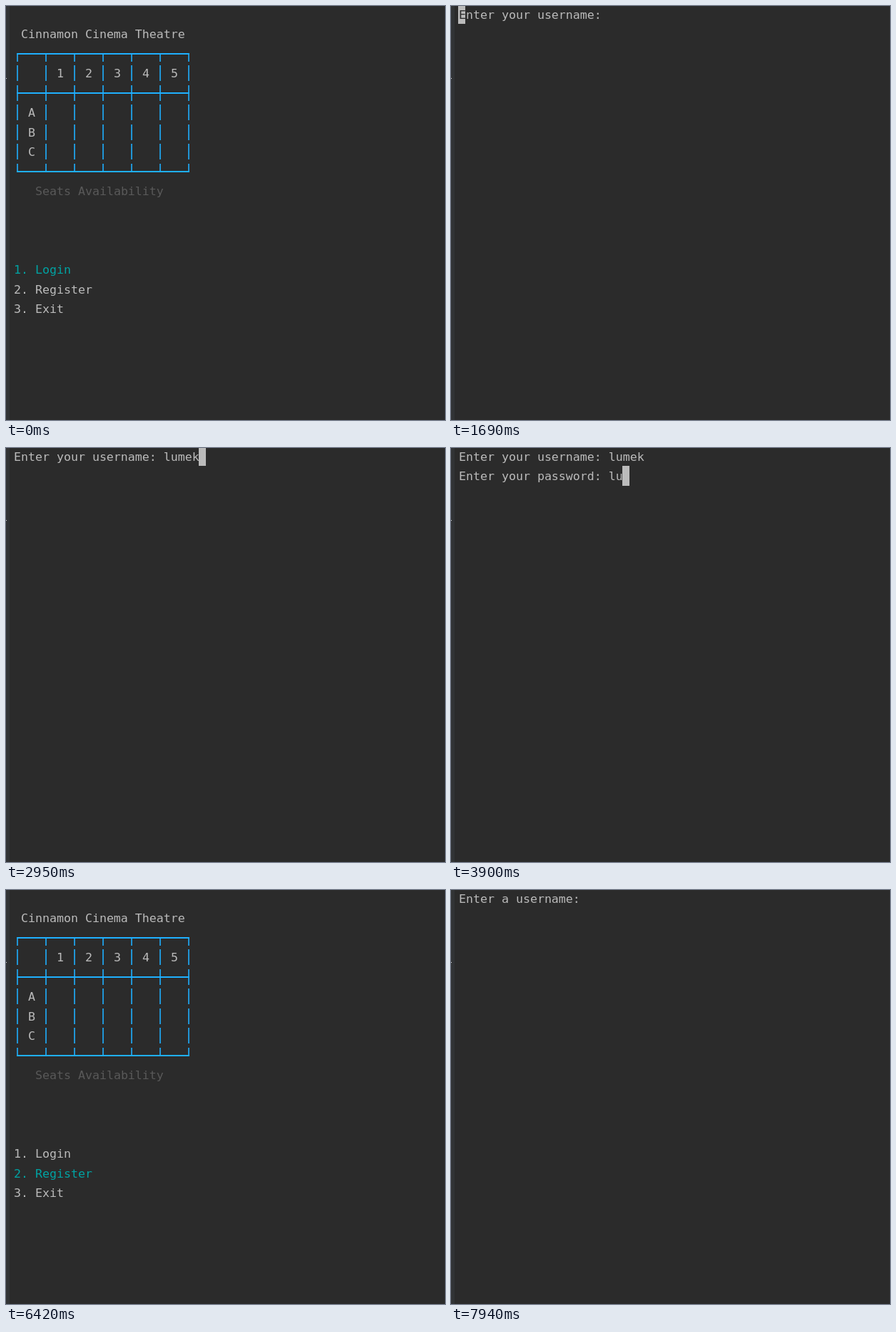
These frames come from a looping animation (615 by 580 pixels, 8 s). An HTML page with a canvas:

```html
<!DOCTYPE html>
<html lang="en">
<head>
<meta charset="utf-8">
<title>Terminal session</title>
<style>
  html, body { margin: 0; width: 100%; height: 100%; overflow: hidden; background: #2b2b2b; }
  canvas { display: block; }
</style>
</head>
<body>
<canvas id="stage" width="615" height="580"></canvas>
<script>
const ctx = document.getElementById('stage').getContext('2d', { alpha: false });
const LOOP = 8000, LEFT = 10, CELL = 10, ROW = 27.5;
const BG = '#2b2b2b', TEXT = '#bbbbbb', BLUE = '#1fb0ff', CYAN = '#00a3a3', GRAY = '#595959', RED = '#ff4050';
const USER = 'lumek';
const ASK_NAME = 'Enter your username: ', ASK_PASSWORD = 'Enter your password: ', ASK_NEW = 'Enter a username: ';

const baseline = row => Math.floor(18 + ROW * row);

function rect(x, y, w, h, color) {
  ctx.fillStyle = color;
  ctx.fillRect(x, y, w, h);
}

// Glyphs sit one pixel right of their cell's edge.
function print(text, col, row, color = TEXT) {
  ctx.fillStyle = color;
  ctx.fillText(text, LEFT + 1 + CELL * col, baseline(row));
}

function cursor(col, row, under = '') {
  rect(LEFT + CELL * col, 28 * row - 3, CELL, 28, TEXT);
  print(under, col, row, BG);
}

function table(top) {
  for (let i = 0; i <= 6; i++) {
    const base = baseline(top + i);
    const middle = base - 6;
    const from = i === 0 ? middle - 1 : base - 17;
    const to = i === 6 ? middle + 1 : base + 5;
    for (let k = 0; k <= 6; k++) rect(15.2 + 40 * k, from, 1.6, to - from, BLUE);
    if (i === 0 || i === 2 || i === 6) rect(15.2, middle - 1, 241.6, 2, BLUE);
  }
  for (let n = 1; n <= 5; n++) print(String(n), 2 + 4 * n, top + 1);
  [...'ABC'].forEach((letter, i) => print(letter, 2, top + 3 + i));
}

function menu(selected, top = 1) {
  print('Cinnamon Cinema Theatre', 1, top);
  table(top + 1);
  print('Seats Availability', 3, top + 8, GRAY);
  ['Login', 'Register', 'Exit'].forEach((item, i) =>
    print(`${i + 1}. ${item}`, 0, 13 + i, i === selected ? CYAN : TEXT));
}

function prompt(label, typed, row, showCursor) {
  const line = label + USER.slice(0, typed);
  print(line, 0, row);
  if (showCursor) cursor(line.length, row);
}

function freshPrompt(label) {
  prompt(label, 0, 0, false);
  cursor(0, 0, 'E');
}

function typeName(t) {
  const step = Math.min(5, Math.floor((t - 2490) / 92));
  prompt(ASK_NAME, Math.max(1, step), 0, step > 0);
}

function typePassword(t) {
  const typed = [3750, 3900, 4170, 4220, 4370].filter(key => t >= key).length;
  prompt(ASK_NAME, 5, 0, false);
  prompt(ASK_PASSWORD, typed, 1, true);
}

function loginFailed() {
  prompt(ASK_NAME, 5, 0, false);
  prompt(ASK_PASSWORD, 5, 1, false);
  print('Invalid username or password', 0, 2, RED);
  menu(0, 4);
}

// Each scene lasts until the start of the next one.
const scenes = [
  [0, () => menu(0)],
  [500, () => menu(1)],
  [1030, () => {}],
  [1080, () => menu(0)],
  [1690, () => freshPrompt(ASK_NAME)],
  [1760, () => prompt(ASK_NAME, 0, 0, true)],
  [2290, () => prompt(ASK_NAME, 0, 0, false)],
  [2490, typeName],
  [3550, typePassword],
  [4570, loginFailed],
  [6420, () => menu(1)],
  [7410, () => freshPrompt(ASK_NEW)],
  [7480, () => prompt(ASK_NEW, 0, 0, true)],
  [7940, () => prompt(ASK_NEW, 0, 0, false)]
];

function draw(t) {
  rect(0, 0, 615, 580, BG);
  rect(0, 0, 5, 580, '#313335');
  rect(0, 101, 1, 1, '#e0e0e0');
  ctx.font = '16.6px "DejaVu Sans Mono", monospace';
  scenes.findLast(([start]) => t >= start)[1](t);
}

const began = performance.now();
function tick() {
  draw((performance.now() - began) % LOOP);
  requestAnimationFrame(tick);
}
tick();
</script>
</body>
</html>
```
